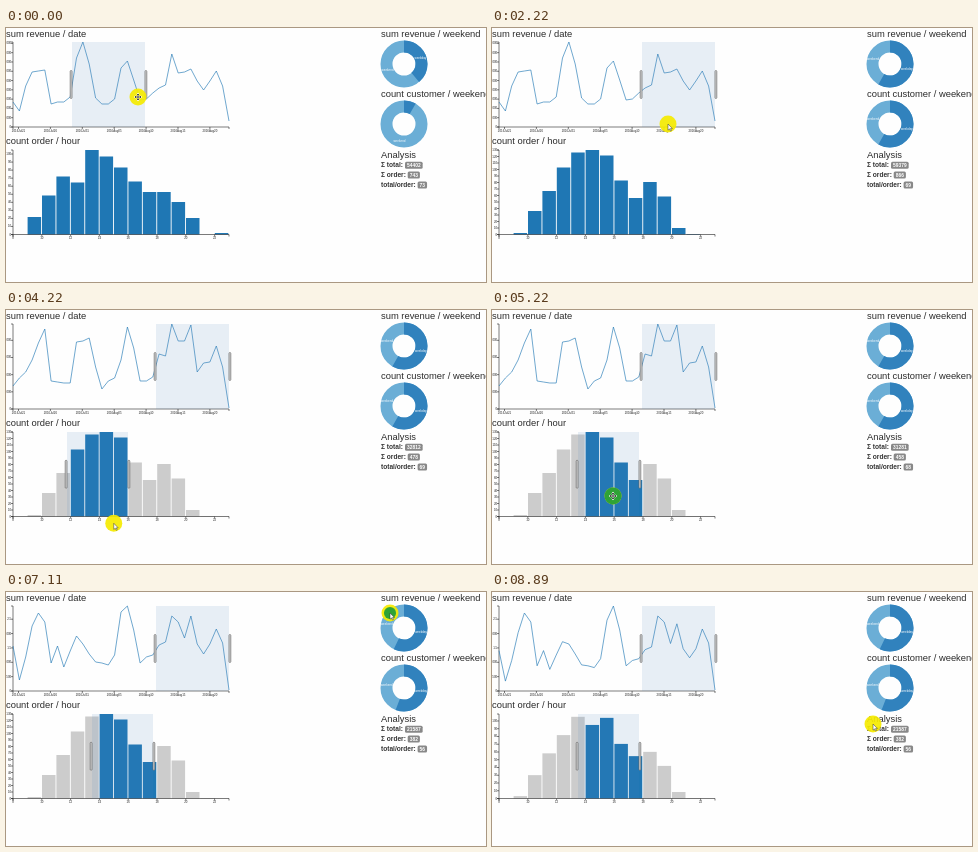
Animation of 480x254 px, one loop 9 s. Source, as an HTML page:

```html
<!DOCTYPE html>
<html lang="en">
<head>
<meta charset="utf-8">
<title>Revenue dashboard</title>
<style>
  html, body { margin: 0; width: 100%; height: 100%; overflow: hidden; background: #fefefe; }
  svg { display: block; width: 480px; height: 254px; font-family: "Liberation Sans", Arial, sans-serif; fill: #333; }
  .title { font-size: 9.4px; fill: #2b2b2b; }
  .label { font-size: 6.6px; font-weight: bold; }
  .badge { font-size: 4.9px; font-weight: bold; fill: #fff; text-anchor: middle; }
  .tick { font-size: 2.9px; fill: #222; }
  .mid { text-anchor: middle; }
  .end { text-anchor: end; }
  .slice { font-size: 3px; fill: #fff; text-anchor: middle; }
  .axis { fill: none; stroke: #222; stroke-width: .6; }
  .line { fill: none; stroke: #1f77b4; stroke-width: .75; stroke-opacity: .85; }
  .brush { fill: steelblue; fill-opacity: .125; }
  .grip { fill: #ddd; stroke: #666; stroke-width: .7; }
  .ring { fill: none; stroke-width: 12; }
</style>
</head>
<body>
<svg viewBox="0 0 480 254">
  <text class="title" x="0" y="8.6">sum revenue / date</text>
  <text class="title" x="0" y="116.2">count order / hour</text>
  <text class="title" x="375" y="8.6">sum revenue / weekend</text>
  <text class="title" x="375" y="69.4">count customer / weekend</text>
  <text class="title" x="375" y="130">Analysis</text>
  <text class="label" x="375" y="139.3">Σ total:</text>
  <text class="label" x="375" y="149.3">Σ order:</text>
  <text class="label" x="375" y="159.1">total/order:</text>
  <g id="revenue"></g>
  <g id="hours"></g>
  <g id="pies"></g>
  <g id="stats"></g>
  <g id="pointer"></g>
</svg>
<script>
const LOOP = 9000, STEP = LOOP / 81;
const LEFT = 7, RIGHT = 223, DAY = 216 / 34, HOUR = 14.4;
const $ = id => document.getElementById(id);

// Daily revenue as y positions
const allDay = [74,83,58,44,43,42,76,74,74,69,30,14,36,70,76,76,71,40,33,52,72,71,65,60,57,26,45,44,41,53,62,53,43,58,93];
const midday = [76,68,62,50,33,19,71,72,73,73,32,31,28,57,79,71,68,50,17,38,71,71,67,44,46,14,31,31,15,62,53,52,36,57,98];
const afternoon = [54,88,65,34,21,30,71,54,75,48,24,37,53,70,71,73,63,20,14,38,71,65,63,53,50,24,30,46,24,52,62,52,37,51,98];
afternoon.splice(9, 4, 59, 44, 52, 62);
const weekendOnly = afternoon.map((y, i) => [4, 5].includes(i % 7) ? y : y + (98 - y) * .35);

// Orders per hour as bar heights
const julyBars = [0,17.5,39,58,52,84.5,78,67,53,42.5,42.5,32.5,16.5,0,1.5];
const augustBars = [0,1.5,23.5,43.5,67,82,84.5,79,54,36.5,52.5,38,6.5,.5,0];
const weekendBars = [0,4.5,23,49,55,81,48,84.5,56,56,33,20,6.5,0,0];

const linear = p => p;
const smooth = p => p < .5 ? 4 * p ** 3 : 1 - 4 * (1 - p) ** 3;
const mix = (a, b, p) => Array.isArray(a) ? a.map((v, i) => mix(v, b[i], p)) : a + (b - a) * p;

// Value at time t from [time, value] keys
function track(t, keys, ease = smooth) {
  const n = keys.findIndex(k => k[0] > t);
  if (n === 0) return keys[0][1];
  if (n < 0) return keys[keys.length - 1][1];
  const [t0, a] = keys[n - 1], [t1, b] = keys[n];
  return mix(a, b, ease((t - t0) / (t1 - t0)));
}
const hold = (t, keys) => keys.filter(k => k[0] <= t).pop()[1];

const text = (cls, x, y, s) => `<text class="${cls}" x="${x}" y="${y}">${s}</text>`;

function axes(top, base, max, step, xTicks) {
  let d = `M5,${top}H${LEFT}V${base}H5M${LEFT},${base + 2}V${base}H${RIGHT}v2`, out = "";
  for (let v = 0; v <= max; v += step) {
    const y = base - v / max * (base - top);
    d += `M5,${y}h2`;
    out += text("tick end", 5.2, y + 1, v >= 1000 ? v / 1000 + ",000".slice(0, v % 1000 ? 0 : 4) : v);
  }
  for (const [x, label] of xTicks) {
    d += `M${x},${base}v2`;
    out += text("tick mid", x, base + 4.8, label);
  }
  return `<path class="axis" d="${d}"/>` + out;
}

function brush(a, b, top, base) {
  const grip = x => `<rect class="grip" x="${x}" y="${(top + base) / 2 - 14}" width="1.8" height="28" rx=".9"/>`;
  return `<rect class="brush" x="${a}" y="${top}" width="${b - a}" height="${base - top}"/>` + grip(a - 1.8) + grip(b);
}

const dates = ["Jul21", "Jul26", "Jul31", "Aug05", "Aug10", "Aug15", "Aug20"]
  .map((s, i) => [12.5 + i * 31.9, "2016" + s]);
const hourTicks = [...Array(8)].map((_, i) => [LEFT + i * 2 * HOUR, 8 + i * 2]);

function drawRevenue(t) {
  const ys = track(t, [[3330, allDay], [3900, midday], [5280, midday], [5890, afternoon],
    [7330, afternoon], [7900, weekendOnly], [8380, weekendOnly], [9260, afternoon]]);
  const [max, step] = hold(t, [[0, [9150, 1000]], [3560, [4950, 1000]], [5560, [2960, 500]]]);
  const a = track(t, [[110, 66], [670, 150]]);
  const path = ys.map((y, i) => `${(LEFT + i * DAY).toFixed(1)},${y.toFixed(1)}`).join(" ");
  $("revenue").innerHTML = axes(14, 99, max, step, dates)
    + `<polyline class="line" points="${path}"/>` + brush(a, a + 73, 14, 99);
}

function drawHours(t) {
  const base = 206.5, top = 122;
  const bars = track(t, [[670, julyBars], [1330, augustBars], [7330, augustBars], [7900, weekendBars],
    [8380, weekendBars], [9260, augustBars]]);
  const max = track(t, [[670, 105], [1330, 130], [7330, 130], [7900, 60], [8380, 60], [9260, 130]]);
  const on = t >= 2660;
  const a = track(t, [[4670, 61], [5110, 86]]);
  const b = track(t, [[2660, 61], [3110, 111], [3450, 122], [4670, 122], [5110, 147]], linear);
  const rects = bars.map((h, i) => {
    const x = LEFT + i * HOUR, lit = !on || x >= a && x < b;
    return `<rect x="${x + .2}" y="${base - h}" width="13.5" height="${h}" fill="${lit ? "#1f77b4" : "#ccc"}"/>`;
  }).join("");
  $("hours").innerHTML = rects + axes(top, base, max, max > 90 ? 10 : 5, hourTicks)
    + (on ? brush(a, b, top, base) : "");
}

function pie(cy, angle, dark) {
  const cx = 398, r = 17.5;
  const label = (deg, s) => {
    const q = deg * Math.PI / 180;
    return text("slice", cx + r * Math.sin(q), cy - r * Math.cos(q) + 1, s);
  };
  const ring = (color, extra = "") => `<circle class="ring" cx="${cx}" cy="${cy}" r="${r}" stroke="${color}" ${extra}/>`;
  return ring("#6baed6")
    + ring(dark, `pathLength="360" stroke-dasharray="${angle} 360" transform="rotate(-90 ${cx} ${cy})"`)
    + (angle > 40 ? label(angle / 2, "weekday") : "")
    + label(180 + angle / 2, "weekend");
}

function drawPies(t) {
  const picked = t >= 7300 && t < 8300;
  const revenue = track(t, [[330, 140], [780, 210], [5280, 210], [5890, 206]]);
  const customers = track(t, [[455, 30], [970, 210], [5280, 210], [5890, 201], [7330, 201], [7800, 0],
    [8300, 0], [8770, 201]]);
  $("pies").innerHTML = pie(36, revenue, picked ? "#ccc" : "#3182bd") + pie(96, customers, "#3182bd");
}

function drawStats(t) {
  const values = hold(t, [[0, [54402, 743, 73]], [440, [59379, 866, 69]], [3330, [32812, 478, 69]],
    [4880, [31281, 458, 68]], [5540, [21587, 382, 56]], [7300, [9282, 164, 57]], [8300, [21587, 382, 56]]]);
  $("stats").innerHTML = values.map((v, i) => {
    const x = [399, 401.7, 411.6][i], y = 133.7 + i * 9.9, w = String(v).length * 2.73 + 4;
    return `<rect x="${x}" y="${y}" width="${w}" height="7" rx="1.5" fill="#888"/>`
      + text("badge", x + w / 2, y + 5.3, v);
  }).join("");
}

const presses = [[80, 700], [2640, 3500], [4600, 5300], [7060, 7280], [8200, 8320]];
const MOVE = "M-3,0H3M0,-3V3M-1,-2L0,-3L1,-2M-1,2L0,3L1,2M-2,-1L-3,0L-2,1M2,-1L3,0L2,1";
const ARROW = "M0,0V6.2L1.5,4.9L2.5,7L3.4,6.6L2.5,4.6H4.4Z";

function drawPointer(t) {
  const [x, y] = track(t, [[110, [132, 69]], [670, [217, 69]], [1110, [217, 69]], [1440, [195, 88]],
    [1670, [195, 88]], [2220, [176, 96]], [2560, [61, 154]], [2660, [61, 154]], [3110, [111, 155]],
    [3450, [122, 155]], [3560, [122, 155]], [3900, [118, 237]], [4560, [96, 186]], [4670, [96, 186]],
    [5110, [121, 186]], [6200, [121, 186]], [7110, [384, 21]], [8330, [384, 21]], [8890, [381, 132]]]);
  const press = presses.find(([from, to]) => t >= from && t < to);
  const arrow = t > 1440 && t < 2560 || t > 3560 && t < 4500 || t > 6300;
  const green = press ? Math.min(8.5, 4 + (t - press[0]) / 25) : 0;
  const icon = arrow
    ? `<path d="${ARROW}" fill="#fff" stroke="#333" stroke-width=".5"/>`
    : `<path d="${MOVE}" fill="none" stroke="#fff" stroke-width="1.6"/><path d="${MOVE}" fill="none" stroke="#222" stroke-width=".7"/>`;
  $("pointer").innerHTML = `<g transform="translate(${x} ${y})">`
    + `<circle r="8.5" fill="#f5ea00" fill-opacity=".92"/>`
    + `<circle r="${green}" fill="#2fa336"/>${icon}</g>`;
}

let last = -1;
function frame(now) {
  const n = Math.floor((now % LOOP + 6) / STEP) % 81;
  if (n !== last) {
    last = n;
    const t = n * STEP;
    for (const draw of [drawRevenue, drawHours, drawPies, drawStats, drawPointer]) draw(t);
  }
  requestAnimationFrame(frame);
}
frame(performance.now());
</script>
</body>
</html>
```
